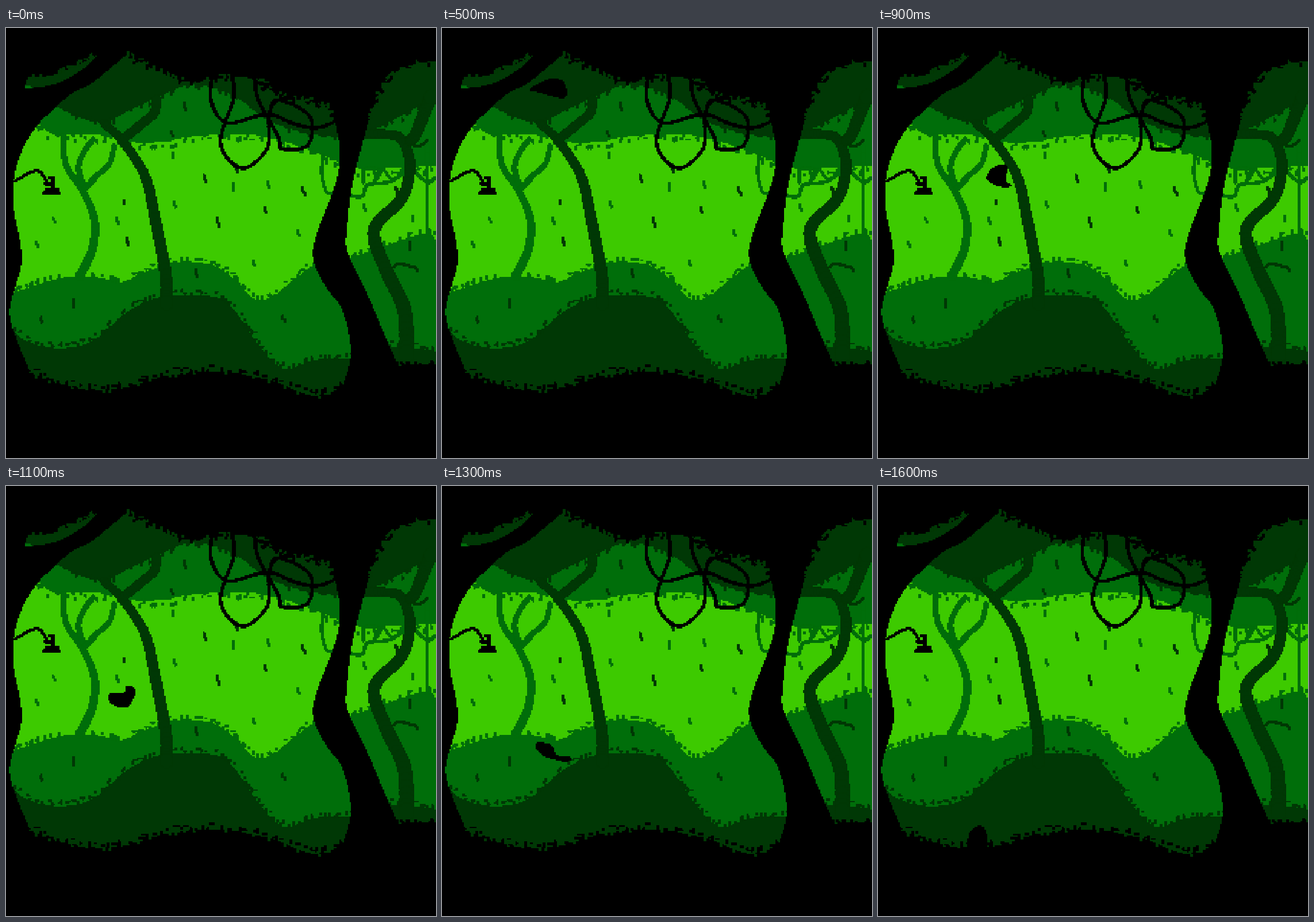
An HTML page with a canvas for the animation above (1.7 s loop, 748 px wide and 748 px high).

```html
<!DOCTYPE html>
<html lang="en">
<head>
<meta charset="utf-8">
<title>Falling leaf</title>
<style>
html, body { margin: 0; width: 100%; height: 100%; overflow: hidden; background: #000; }
canvas { display: block; width: 100%; height: 100%; image-rendering: pixelated; }
</style>
</head>
<body>
<canvas id="stage"></canvas>
<script>
const STAGE = 748, GRID = 299, LOOP = 1700, STEP = 100;
const BRIGHT = '#3dca00', MID = '#006e0a', DARK = '#003805', BLACK = '#000';

const makeCtx = canvas => {
  canvas.width = canvas.height = GRID;
  return canvas.getContext('2d', { willReadFrequently: true });
};
const stage = makeCtx(document.getElementById('stage'));
const scene = makeCtx(document.createElement('canvas'));
const ink = makeCtx(document.createElement('canvas'));

let seed = 11;
const rand = () => {
  seed = (seed * 1664525 + 1013904223) >>> 0;
  return seed / 4294967296;
};
const points = text => text.split(' ').map(p => p.split(',').map(Number));

// Samples a smooth curve through the key points.
function curve(text, closed = false) {
  const p = points(text), n = p.length, out = [];
  const at = i => closed ? p[(i + n) % n] : p[Math.max(0, Math.min(n - 1, i))];
  for (let i = 0; i < (closed ? n : n - 1); i++) {
    const a = at(i - 1), b = at(i), c = at(i + 1), d = at(i + 2);
    for (let t = 0; t < 1; t += .125) {
      out.push([0, 1].map(k => b[k] + t / 2 * (c[k] - a[k] +
        t * (2 * a[k] - 5 * b[k] + 4 * c[k] - d[k] + t * (3 * (b[k] - c[k]) + d[k] - a[k])))));
    }
  }
  if (!closed) out.push(p[n - 1]);
  return out;
}

// Paints one flat colour with hard pixel edges.
function layer(target, color, draw) {
  ink.setTransform(1, 0, 0, 1, 0, 0);
  ink.clearRect(0, 0, GRID, GRID);
  ink.scale(GRID / STAGE, GRID / STAGE);
  ink.fillStyle = ink.strokeStyle = color;
  ink.lineCap = ink.lineJoin = 'round';
  draw();
  const img = ink.getImageData(0, 0, GRID, GRID);
  for (let i = 3; i < img.data.length; i += 4) img.data[i] = img.data[i] > 127 ? 255 : 0;
  ink.putImageData(img, 0, 0);
  target.drawImage(ink.canvas, 0, 0);
}

function outline(p) {
  p.forEach(([x, y], i) => i ? ink.lineTo(x, y) : ink.moveTo(x, y));
  ink.closePath();
}

function fill(p) {
  ink.beginPath();
  outline(p);
  ink.fill();
}

const fillTo = (edge, y) => fill([...edge, [STAGE, y], [0, y]]);

function limb(text, from, to = from) {
  const p = curve(text);
  for (let i = 1; i < p.length; i++) {
    ink.beginPath();
    ink.lineWidth = from + (to - from) * i / p.length;
    ink.moveTo(...p[i - 1]);
    ink.lineTo(...p[i]);
    ink.stroke();
  }
}

// Ragged leaves scattered along an edge, shifted by up to `reach`.
function fringe(edge, reach, gap = 9, long = 10) {
  for (let i = 1; i < edge.length; i++) {
    const [x, y] = edge[i];
    const d = Math.hypot(x - edge[i - 1][0], y - edge[i - 1][1]);
    for (let left = d / gap; rand() < left; left--) {
      const len = 5 + rand() * (long - 5), tall = rand() < .6;
      ink.fillRect(x - 2 + d * (rand() - .5), y - len / 2 + reach * rand(), tall ? 5 : len, tall ? len : 4);
    }
  }
}

// Drifting flecks: two stacked blocks, the lower one slightly shifted.
function flecks(text) {
  for (const [x, y] of points(text)) {
    const h = 11 + rand() * 8;
    ink.fillRect(x - 3, y - h / 2, 5, h * .65);
    ink.fillRect(x - 3 + rand() * 4, y, 5, h / 2);
  }
}

const roof = curve('210,46 260,73 320,94 395,84 430,90 480,118 545,131 570,150');
const floor = curve('585,625 535,640 460,613 370,597 280,605 200,627 130,627 60,608 40,595');
const leftCave = [
  ...roof,
  ...curve('570,150 581,215 572,275 534,385 555,448 585,490 600,565 585,625'),
  ...floor,
  ...curve('40,595 18,540 6,490 26,415 25,375 13,310 18,240 50,175 110,117 150,95 210,46')
];
const rightRoof = curve('630,165 650,110 668,85 700,66 760,54');
const rightFloor = curve('760,585 682,587');
const rightCave = [
  ...rightRoof,
  ...rightFloor,
  ...curve('682,587 655,525 632,470 610,425 593,385 593,350 603,270 630,165')
];
const cleftTop = curve('38,86 75,83 110,70 160,47');
const cleft = [...cleftTop, ...curve('160,47 130,74 85,97 31,106')];

const midLeaves = curve('52,160 85,186 150,184 240,200 340,187 440,187 545,218 605,243 680,243 748,240');
const darkLeaves = curve('78,132 160,164 225,138 300,104 340,99 400,120 455,160 520,182 580,190 620,186 715,138 748,117');
const midHill = curve('0,464 45,450 100,434 160,434 200,442 240,425 300,407 360,413 400,440 432,471 465,466 535,413 593,402 640,386 735,357 748,392');
const darkHill = curve('0,510 30,542 90,557 150,545 205,498 260,470 330,465 385,478 435,545 482,592 540,577 600,575 672,555 748,562');

function paintScene() {
  scene.fillStyle = BRIGHT;
  scene.fillRect(0, 0, GRID, GRID);

  layer(scene, MID, () => {
    fillTo(midLeaves, 0);
    fillTo(midHill, STAGE);
    fringe(midLeaves, 12);
    fringe(midHill, -6);
    limb('128,432 150,385 154,335 136,288 104,237 100,188', 16, 9);
    limb('136,278 126,243 137,213 152,193', 10, 9);
    limb('136,280 158,257 180,235 188,205', 11, 8);
    limb('553,222 549,250 558,286 574,284', 5);
    limb('600,292 620,292 630,273 666,268 692,252', 6);
    limb('622,270 625,246 652,248 640,269 652,245 675,264 690,245', 5);
    limb('733,205 733,360', 6);
    limb('712,250 733,268 748,260', 6);
    flecks('82,334 54,376 193,335 293,307 291,221 395,277 456,273 509,357 430,409 708,332 623,312');
  });

  layer(scene, DARK, () => {
    fillTo(darkLeaves, 0);
    fillTo(darkHill, STAGE);
    fringe(darkLeaves, 4, 14);
    fringe(darkHill, -8);
    limb('170,165 205,200 242,258 259,330 278,430 279,480', 14, 22);
    limb('205,192 238,165 258,147 262,125', 16);
    limb('615,184 665,185 690,196 703,240 689,296 641,350 660,418 693,490 697,570', 14, 26);
    limb('703,196 712,186 725,155 740,118', 18, 23);
    limb('711,206 722,204 733,195', 5);
    limb('675,416 684,410 712,417 716,424', 5);
    limb('679,278 682,290', 6);
    flecks('345,262 517,284 450,317 368,338 331,427 117,479 61,508 482,506 205,303 210,371 401,245 288,184 311,137 703,379');
  });

  layer(scene, BLACK, () => {
    ink.beginPath();
    ink.rect(-10, -10, STAGE + 20, STAGE + 20);
    [leftCave, rightCave, cleft].forEach(outline);
    ink.fill('evenodd');
  });
  layer(scene, DARK, () => {
    fill(cleft);
    fringe(roof, -4, 14);
    fringe(rightRoof, -4, 12);
    fringe(cleftTop, -3, 14);
    fringe(floor, 3, 20);
  });
  layer(scene, MID, () => ink.fillRect(32, 101, 12, 5));

  layer(scene, BLACK, () => {
    fringe(roof, 6, 14);
    fringe(rightRoof, 5, 13);
    fringe(floor, -8, 11, 13);
    fringe(rightFloor, -5, 10);
    limb('358,86 357,128 385,165 455,150 505,168 545,173 580,158', 6);
    limb('393,83 396,122 373,200 410,244 454,210 458,150 475,125 529,154 525,204 480,210 473,188 439,125 433,90', 6);
    limb('462,137 472,126 500,121', 5);
    // Hanging pod
    limb('16,266 54,248 72,270', 5);
    ink.fillRect(72, 258, 14, 5);
    ink.fillRect(78, 260, 6, 20);
    ink.fillRect(66, 267, 12, 7);
    ink.fillRect(67, 277, 26, 9);
    ink.fillRect(62, 284, 32, 6);
  });
}

// Key poses of the fall: outlines sit around the leaf's own centre.
const keys = [
  { at: 300, x: 190, y: 45 },
  { at: 500, x: 185, y: 105, shape: '-33,1 3,-17 25,-13 32,4 25,17 -13,8' },
  { at: 700, x: 212, y: 166, shape: '-27,-15 -9,-8 20,-13 27,6 19,15 -17,8' },
  { at: 900, x: 212, y: 258, shape: '-23,5 -17,-11 0,-20 13,-16 10,6 20,15 13,19 -7,16' },
  { at: 1200, x: 198, y: 420, shape: '-23,-4 2,-6 5,-18 18,-17 22,-3 7,20 -20,13' },
  { at: 1400, x: 187, y: 508, shape: '-31,-13 -22,-18 -2,-13 8,4 33,8 22,16 -17,5' },
  { at: 1600, x: 173, y: 612, shape: '-15,20 -15,-6 -2,-20 13,-15 16,20' }
];

function drawLeaf(time) {
  const i = keys.findIndex(k => time <= k.at);
  if (i < 1) return;
  const a = keys[i - 1], b = keys[i], u = (time - a.at) / (b.at - a.at);
  const shape = u < .5 && a.shape || b.shape;
  layer(stage, BLACK, () => {
    ink.translate(a.x + (b.x - a.x) * u, a.y + (b.y - a.y) * u);
    fill(curve(shape, true));
  });
}

let shown = -1;
function frame() {
  const step = Math.floor((performance.now() - start) % LOOP / STEP);
  if (step !== shown) {
    shown = step;
    stage.drawImage(scene.canvas, 0, 0);
    drawLeaf(step * STEP);
  }
  requestAnimationFrame(frame);
}

paintScene();
const start = performance.now();
frame();
</script>
</body>
</html>
```
